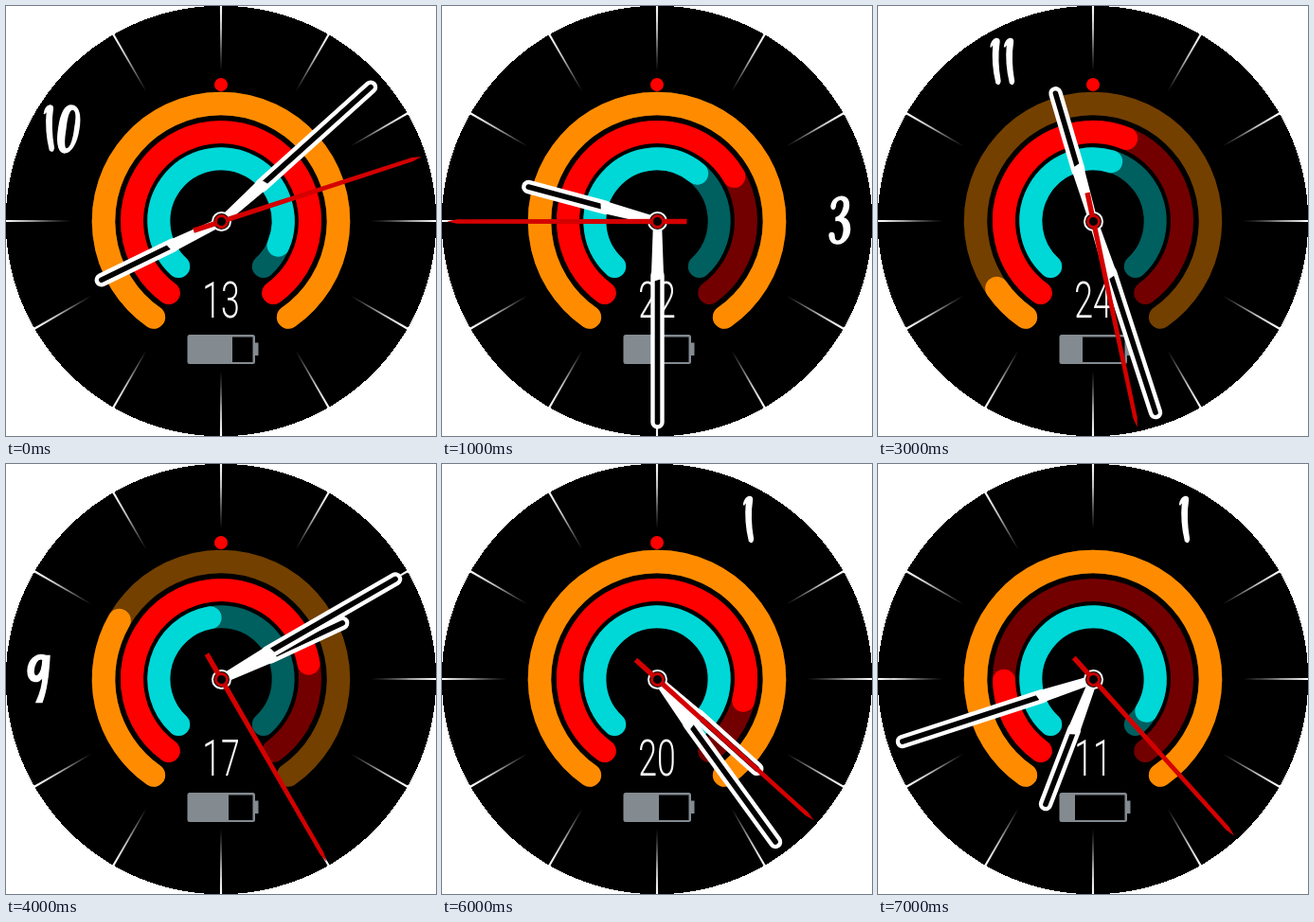
An HTML page that plays this animation: 454x454 px, repeating every 8 s.

```html
<!DOCTYPE html>
<html lang="en">
<head>
<meta charset="utf-8">
<title>Watch face</title>
<style>
  html, body { margin: 0; width: 100%; height: 100%; overflow: hidden; background: #fff; }
  svg { display: block; width: 454px; height: 454px; }
  .arc { fill: none; stroke-linecap: round; }
  #day {
    font: 300 54px Roboto, "Open Sans", sans-serif;
    text-anchor: middle;
    fill: #fff;
  }
</style>
</head>
<body>
<svg viewBox="0 0 454 454">
  <defs>
    <linearGradient id="fade" gradientUnits="userSpaceOnUse" x1="0" y1="-227" x2="0" y2="-158">
      <stop offset="0" stop-color="#fff"/>
      <stop offset=".4" stop-color="#fff" stop-opacity=".75"/>
      <stop offset="1" stop-color="#fff" stop-opacity="0"/>
    </linearGradient>
  </defs>
  <circle cx="227" cy="227" r="227.300" shape-rendering="crispEdges"/>
  <g transform="translate(227 227)">
    <g id="ticks"></g>
    <g id="arcs"></g>
    <circle id="dot" cy="-144" r="7"/>
  </g>
  <text id="day" transform="translate(227 328.500) scale(.66 1)"></text>
  <g fill="#838b91">
    <rect x="191.5" y="347" width="71.5" height="31" rx="2.5"/>
    <path d="M263 355.500h3.500v13.500h-3.500z"/>
    <rect id="empty" y="349.5" height="26.5" fill="#000"/>
  </g>
  <g id="month" fill="#fff" fill-rule="evenodd" stroke="#fff" stroke-width="1.4"></g>
  <g transform="translate(227.500 227.500)">
    <g id="hour"></g>
    <g id="minute"></g>
    <circle r="9.5" stroke="#fff" stroke-width="2"/>
    <g id="second">
      <path d="M-2.700 31L-2.200 -212L0 -222L2.200 -212L2.700 31Z" fill="#d40000"/>
      <circle r="6" stroke="#c80000" stroke-width="3"/>
    </g>
  </g>
</svg>
<script>
const $ = id => document.getElementById(id);
const NS = 'http://www.w3.org/2000/svg';
const STEP = 1000;

// Brush numerals, centred on the origin
const GLYPHS = {
  0: 'M3-25C12-25 13-12 11 0C9 14 3 25-4 25C-12 25-12 10-10-2C-8-15-4-25 3-25ZM4-21C0-20-2-10-3 0C-5 12-5 21-2 21C3 21 6 8 7-2C9-13 9-21 4-21Z',
  1: 'M-5-16Q-4-24 1-25Q4-25 4-22Q1-2 5 20Q4 25 1 22Q-4 2-2-19Q-4-18-5-16Z',
  2: 'M-10-12C-10-22-3-26 3-25C11-24 12-14 9-6C6 4-2 12-5 18C1 15 4 22 10 16C9 24 3 27-2 23C-5 21-8 23-10 25C-10 14 1 2 3-9C5-18 3-22 0-22C-5-22-7-16-8-11Z',
  3: 'M-9-15C-8-24 0-26 4-25C12-23 11-9 3-3C12-1 12 12 8 18C2 27-10 27-11 16C-11 12-6 12-6 16C-6 24 1 23 3 17C6 8 4-1-4 0V-3C4-5 7-20 2-22C-3-23-5-18-5-14C-6-11-9-12-9-15Z',
  5: 'M-8-24Q2-19 11-24Q10-16 2-16Q-3-16-6-18L-6-3C-1-9 12-8 12 8C12 22 4 26-3 25C-9 25-13 20-12 15A4 4 0 1 1-6 18C-6 22-3 23-1 23C4 22 5 16 5 8C5-4-1-5-6 0L-8 0Z',
  9: 'M8-24H12C11-5 9 12 4 25H-2C3 14 5 5 5-2C1 6-11 5-11-8C-11-20-1-28 8-24ZM5-20C-1-23-5-14-5-7C-4 1 4-1 5-20Z'
};
const OFFSETS = { 10: [-14.5, 6], 11: [-6.5, 8], 12: [-14.5, 6] };

// Radius, stroke width, end angle, bright colour, dim colour
const RINGS = [
  [124, 24.5, 145, '#ff8c00', '#734000'],
  [94, 24, 144, '#ff0000', '#730000'],
  [65.7, 24, 137, '#00d7d7', '#005f5f']
];
const FULL = 150;

// month, day, hour, minute, second, ring angles (3), battery edge, dot colour
const STATES = [
  [10, 13, 8, 8, 12, FULL, FULL, 113, 239, '#f00'],
  [3, 22, 9, 30, 45, FULL, 60, 40, 230, '#f00'],
  [12, 19, 12, 55, 50, FULL, -3, 88, 240, '#f00'],
  [11, 24, 11, 27, 28, -125, 22, 17, 216, '#f00'],
  [9, 17, 2, 10, 25, -60, 80, -10, 235, '#f00'],
  [5, 28, 5, 39, 59, -94, FULL, -56, 260, '#7a0000'],
  [1, 20, 4, 24, 22, FULL, 104, FULL, 229, '#f00'],
  [1, 11, 6, 42, 23, FULL, -91, 121, 208, 'none']
];

function add(parent, tag, attrs) {
  const el = document.createElementNS(NS, tag);
  for (const k in attrs) el.setAttribute(k, attrs[k]);
  return parent.appendChild(el);
}

function polar(r, deg) {
  const a = deg * Math.PI / 180;
  return [r * Math.sin(a), -r * Math.cos(a)];
}

function arc(r, from, to) {
  return `M${polar(r, from)}A${r} ${r} 0 ${+(to - from > 180)} 1 ${polar(r, to)}`;
}

function buildHand(id, length) {
  const g = $(id);
  add(g, 'rect', {
    x: -5, y: -length, width: 10, height: length - 52, rx: 5,
    stroke: '#fff', 'stroke-width': 4.4
  });
  add(g, 'path', { d: 'M-4.5 0L-6.5-56V-60L6.5-64V-56L4.5 0Z', fill: '#fff' });
}

const ticks = Array.from({ length: 12 }, (_, i) => add($('ticks'), 'path', {
  d: 'M-1.1-228H1.1L.6-158H-.6Z', fill: 'url(#fade)', transform: `rotate(${i * 30})`
}));

const bright = RINGS.map(([r, w, end, on, off]) => {
  const ring = { class: 'arc', 'stroke-width': w };
  add($('arcs'), 'path', { ...ring, stroke: off, d: arc(r, -end, end) });
  return add($('arcs'), 'path', { ...ring, stroke: on });
});

buildHand('hour', 146);
buildHand('minute', 217);

function turn(id, deg) {
  $(id).setAttribute('transform', `rotate(${deg})`);
}

function drawMonth(month) {
  const [x, y] = polar(193, month * 30);
  const offsets = OFFSETS[month] || [0];
  const g = $('month');
  g.replaceChildren();
  g.setAttribute('transform', `translate(${227 + x} ${226.5 + y})`);
  [...String(month)].forEach((digit, i) =>
    add(g, 'path', { d: GLYPHS[digit], transform: `translate(${offsets[i]})` }));
  ticks.forEach((tick, i) =>
    tick.setAttribute('visibility', i === month % 12 ? 'hidden' : 'visible'));
}

function show([month, day, h, m, s, a, b, c, edge, dot]) {
  drawMonth(month);
  $('day').textContent = day;
  [a, b, c].forEach((angle, i) => {
    const [r, , end] = RINGS[i];
    bright[i].setAttribute('d', arc(r, -end, Math.min(angle, end)));
  });
  $('empty').setAttribute('x', edge);
  $('empty').setAttribute('width', 260.5 - edge);
  $('dot').setAttribute('fill', dot);
  turn('hour', h * 30 + m / 2);
  turn('minute', m * 6);
  turn('second', s * 6);
}

let current = -1;
function frame() {
  const i = Math.floor(performance.now() / STEP) % STATES.length;
  if (i !== current) show(STATES[current = i]);
  requestAnimationFrame(frame);
}
frame();
</script>
</body>
</html>
```
